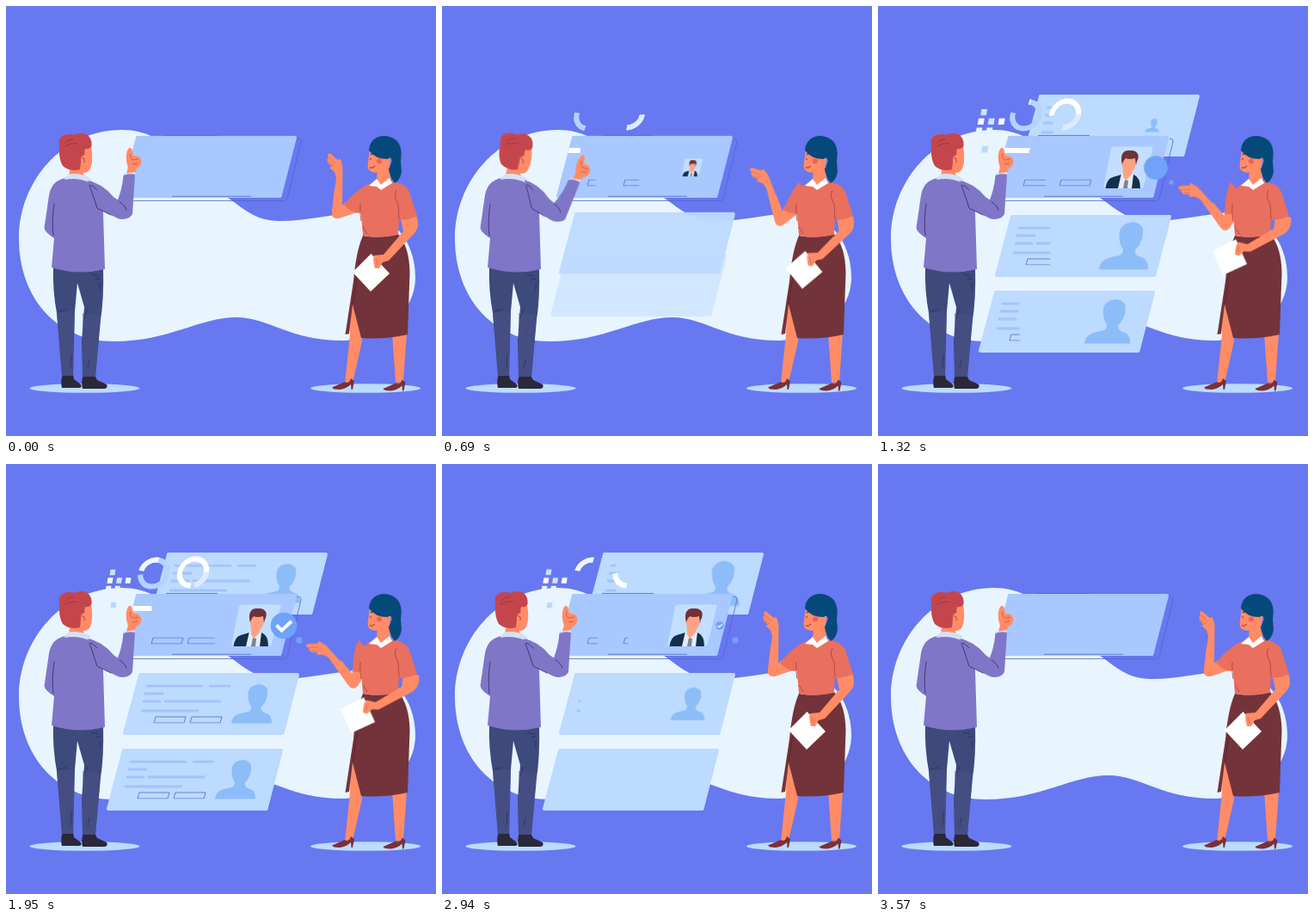
An HTML page without scripts that plays this animation: 500 by 500 pixels, repeating every 3.66 s.

```html
<!DOCTYPE html>
<html lang="en">
<head>
<meta charset="utf-8">
<title>Choosing a candidate</title>
<style>
html, body { margin: 0; width: 100%; height: 100%; overflow: hidden; background: #6878f0; }
svg { display: block; width: 100vw; height: 100vh; }

.skin { fill: #ff8c66; }
.outline { fill: none; stroke: #5268cc; stroke-width: .8; }
.crease { fill: none; stroke: #2f2c5c; stroke-width: .8; stroke-linecap: round; }
.rows { fill: none; stroke: #a2c4fa; stroke-width: 3; }
.panel { stroke-width: 4; stroke-linejoin: round; }

/* --i delays the entrance, --o the exit, --d the slide */
.slide, .pop, .pop > g, .wipe, .wipe > g, .anim {
  animation: 3660ms linear infinite;
}
.slide { animation-name: slide; animation-timing-function: ease-in-out; animation-delay: calc(var(--d) - 3660ms); }
.pop, .pop > g, .photo { transform-box: fill-box; transform-origin: center; }
.pop { animation-name: popIn; animation-delay: calc(var(--i) - 3660ms); }
.pop > g { animation-name: popOut; animation-delay: calc(var(--o) - 3660ms); }
.wipe { animation-name: wipeIn; animation-timing-function: ease-in-out; animation-delay: calc(var(--i) - 3660ms); }
.wipe > g { animation-name: wipeOut; animation-timing-function: ease-in-out; animation-delay: calc(var(--o) - 3660ms); }

@keyframes slide {
  0%, 8.2% { transform: translate(var(--x), var(--y)); opacity: 0; }
  20.5%, 82% { transform: none; opacity: 1; }
  88.8%, 100% { transform: translate(var(--x), var(--y)); opacity: 0; }
}
@keyframes popIn {
  0%, 29.5% { transform: scale(0); }
  33.3% { transform: scale(1.13); }
  35.5% { transform: scale(1.23); }
  43.7%, 98.9% { transform: scale(1); }
  98.91%, 100% { transform: scale(0); }
}
@keyframes popOut {
  0%, 6.8% { transform: scale(0); }
  6.81%, 67.8% { transform: scale(1); }
  73.2% { transform: scale(1.23); }
  74.9% { transform: scale(1.15); }
  77.6% { transform: scale(.85); }
  79.8%, 100% { transform: scale(0); }
}
@keyframes wipeIn {
  0%, 23.8% { clip-path: inset(0 100% 0 0); }
  51.1%, 98.9% { clip-path: inset(0 0% 0 0); }
  98.91%, 100% { clip-path: inset(0 100% 0 0); }
}
@keyframes wipeOut {
  0%, 6.8% { clip-path: inset(0 100% 0 0); }
  6.81%, 54.1% { clip-path: inset(0 0% 0 0); }
  81.4%, 100% { clip-path: inset(0 100% 0 0); }
}

.photo { animation-name: photo; }
@keyframes photo {
  0%, 17.4% { transform: scale(0); }
  21.3% { transform: scale(1.13); }
  23.5% { transform: scale(1.2); }
  31.7%, 81.4% { transform: scale(1); }
  86.9% { transform: scale(1.2); }
  92.9%, 100% { transform: scale(0); }
}
.bar { animation-name: bar; }
@keyframes bar {
  0%, 8.2% { clip-path: inset(0 100% 0 0); }
  30.9%, 45.1% { clip-path: inset(0 0% 0 0); }
  77.9%, 100% { clip-path: inset(0 100% 0 0); }
}
.first { animation-name: first; }
@keyframes first {
  0%, 8.2% { clip-path: inset(0 100% 0 0); }
  47.8%, 64.2% { clip-path: inset(0 0% 0 0); }
  88.8%, 100% { clip-path: inset(0 100% 0 0); }
}
.second { animation-name: second; }
@keyframes second {
  0%, 2.5% { clip-path: inset(0 100% 0 0); }
  35.5%, 47.8% { clip-path: inset(0 0% 0 0); }
  86.1%, 100% { clip-path: inset(0 100% 0 0); }
}
.trim { animation-name: trim; stroke-dasharray: 360 400; }
@keyframes trim {
  0%, 10.7% { stroke-dashoffset: -360; }
  43.7%, 51.6% { stroke-dashoffset: 0; }
  89.3%, 100% { stroke-dashoffset: 360; }
}
.check { animation-name: check; stroke-dasharray: 24 40; }
@keyframes check {
  0%, 36.6% { stroke-dashoffset: 26; }
  43.7%, 100% { stroke-dashoffset: 0; }
}

.joint { transform-origin: var(--at); animation-timing-function: ease-in-out; }
.nod { animation-name: nod; }
@keyframes nod {
  0%, 5.5%, 31.4%, 100% { transform: none; }
  18.9% { transform: rotate(var(--turn)); }
}
.present { animation-name: present; }
@keyframes present {
  0%, 8.2% { transform: none; }
  29.5%, 57.4% { transform: rotate(var(--turn)); }
  73.5%, 100% { transform: none; }
}
.lift { animation-name: lift; }
@keyframes lift {
  0%, 12% { transform: none; }
  34.2%, 58.7% { transform: rotate(var(--turn)); }
  77.9%, 100% { transform: none; }
}
</style>
</head>
<body>
<svg viewBox="0 0 500 500">
  <defs>
    <path id="panel" class="panel" d="M156 245H339L321.500 313H138Z"/>
    <path id="btn" class="outline" d="M174 294H209L207 301H172Z"/>
    <g id="rows">
      <path class="rows" d="M163 258H229M236 258H261M161 267H183M159 276H180M184 276H250M157 287H224"/>
      <use href="#btn"/>
      <use href="#btn" x="42"/>
    </g>
    <path id="bust" fill="#8cbdf8" d="M262 301.500C263 293 268 291 277 289C283 288 285 287 285 282C281 277 281 268 282 264C285 255 300 253 304 262C305 270 302 278 297 282C296 287 298 288 303 290C308 292 309 296 309 301.500Z"/>
    <path id="tile" d="M-2.500 -3.200H3.500L2.500 3.200H-3.500Z"/>
    <path id="heel" fill="#7b3036" d="M401 433L405 436L403 446H401.500L401 440Q396 445 388 446Q380 446 379 443.500L394 437Q399 440 401 433Z"/>
    <circle id="ring" r="15.500" fill="none" pathLength="360"/>
    <mask id="trim" maskUnits="userSpaceOnUse" x="-30" y="-30" width="60" height="60">
      <circle class="anim trim" r="15.500" fill="none" stroke="#fff" stroke-width="8" pathLength="360"/>
    </mask>
  </defs>

  <path fill="#e8f5ff" d="M135 144C65 144 15 205 15 270C15 340 60 390 125 390C190 390 225 362 268 362C305 362 330 389 390 389C440 389 476 355 476 315C476 270 445 238 408 240C380 242 350 250 318 250C285 250 272 230 250 218C215 195 190 144 135 144Z"/>
  <g fill="#bbdbff">
    <ellipse cx="91.500" cy="444.500" rx="64" ry="5.300"/>
    <ellipse cx="418" cy="444.500" rx="64" ry="5.300"/>
  </g>

  <!-- waiting cards -->
  <g transform="translate(-19 88)">
    <g class="slide" style="--d:160ms;--x:19px;--y:-88px;--i:100ms;--o:0ms">
      <use href="#panel" fill="#bddaff" stroke="#bddaff"/>
      <g class="wipe"><g><use href="#rows"/></g></g>
      <g class="pop"><g><use href="#bust"/></g></g>
    </g>
  </g>
  <g class="slide" style="--d:0ms;--x:-3px;--y:-92px;--i:0ms;--o:100ms">
    <use href="#panel" fill="#bddaff" stroke="#bddaff"/>
    <g class="wipe"><g><use href="#rows"/></g></g>
    <g class="pop"><g><use href="#bust"/></g></g>
  </g>
  <g transform="translate(33 -140)">
    <g class="slide" style="--d:330ms;--x:-36px;--y:48px;--i:200ms;--o:200ms">
      <use href="#panel" fill="#bddaff" stroke="#bddaff"/>
      <g class="wipe"><g><use href="#rows"/></g></g>
      <g class="pop"><g><use href="#bust"/></g></g>
    </g>
  </g>

  <!-- charts and tiles -->
  <g stroke-width="6">
    <g transform="translate(172 127) skewX(-10) rotate(190)">
      <g mask="url(#trim)">
        <use href="#ring" stroke="#b4d3ff"/>
        <use href="#ring" stroke="#f2f8ff" stroke-dasharray="90 270"/>
      </g>
    </g>
    <g transform="translate(217.500 126) skewX(-10) rotate(90)">
      <g mask="url(#trim)">
        <use href="#ring" stroke="#fff"/>
        <use href="#ring" stroke="#dcebff" stroke-dasharray="0 270 90"/>
      </g>
    </g>
  </g>
  <g class="pop" style="--i:-100ms;--o:450ms"><g fill="#fff">
    <use href="#tile" x="124" y="126" fill="#cfe3ff"/>
    <use href="#tile" x="121" y="135.500"/>
    <use href="#tile" x="131.500" y="135.500" fill="#cfe3ff"/>
    <use href="#tile" x="142" y="135.500"/>
    <use href="#tile" x="119" y="145" fill="#e8f5ff"/>
    <use href="#tile" x="129.500" y="145" fill="#e8f5ff"/>
    <use href="#tile" x="125" y="164" fill="#b9d7ff"/>
  </g></g>

  <!-- chosen card -->
  <path class="outline" d="M339 154.500H341Q343.500 155 343 158L327 224Q326 226.500 323 226.500H140"/>
  <g transform="translate(-3 -92)">
    <use href="#panel" fill="#a8c8ff" stroke="#a8c8ff"/>
    <use href="#btn" class="anim first"/>
    <g class="anim second"><use href="#btn" x="42"/></g>
  </g>
  <path class="outline" d="M186 150.500H246M193 221.300H285"/>
  <path class="anim bar" fill="#fff" d="M148 165H177L175.500 171H146.500Z"/>
  <g class="anim photo">
    <path fill="#c3deff" d="M274 163.500H317Q320 163.500 319.500 166L309 209Q308 212 305 212H264Q262 212 262.500 209L271 166Q271.500 163.500 274 163.500Z"/>
    <path fill="#12304c" d="M264.500 212Q266 201 273 199L283 196H297Q305 199 305 212Z"/>
    <path fill="#e6ecf6" d="M283 195L279 212H295L297 196Z"/>
    <path fill="#7c8295" d="M287 202L291 203L290 212H285Z"/>
    <path fill="#ffa284" d="M285 175H300Q301 187 296 192L294 197L288 203L285 198V190Q282 182 285 175Z"/>
    <path fill="#6e3238" d="M284 184C281 173 285 167 293 168C302 167 305 174 301 181L300 185L299 177Q292 179 288 177Q285 180 284 184Z"/>
  </g>
  <g class="pop" style="--i:130ms;--o:50ms"><g>
    <circle cx="323" cy="188" r="15.300" fill="#70a2f8"/>
    <path class="anim check" fill="none" stroke="#fff" stroke-width="4" d="M314.500 187.500L320.500 193.500L332 183"/>
  </g></g>
  <g class="pop" style="--i:150ms;--o:460ms"><g><circle cx="341" cy="205" r="3.700" fill="#70a2f8"/></g></g>

  <!-- man -->
  <g>
    <path fill="#2b2838" d="M66 428H78L79 434L87 440Q89 444 85 444H65Q63 436 66 428ZM90 429H103L106 435L117 440Q119 444 115 445H89Q87 437 90 429Z"/>
    <path fill="#3e497c" d="M55 303H113Q114 340 110 365L104 431H89L88 390L91 350L83 322L80 355L78 430H65L59 357Q54 330 55 303Z"/>
    <path fill="#4a558a" d="M59 357L80 355L78 430H65ZM89 357L110 360L104 431H89Z" opacity=".5"/>
    <path class="crease" d="M61 355L70 353M76 405L75 420M99 312L107 314M104 318L109 317M109 322V330M95 352L91 362M95 420L97 412"/>
    <g class="anim joint nod" style="--at:86px 203px;--turn:8deg">
      <path class="skin" d="M80 165L99 163Q102 180 98 189Q96 194 90 194L92 204H72L75 185Z"/>
      <path fill="#c4464c" d="M62 161C59 150 72 147 80 150C90 145 101 150 99.500 163Q97 167 92 166Q91 169 91.500 173Q86 174 87 181L86 190Q74 193 66 186Q61 178 62 161Z"/>
      <path fill="none" stroke="#8f343f" stroke-width=".8" d="M69 160Q72 154 79 155M68 163Q76 159 83 160M88 177Q92 176 91 182"/>
    </g>
    <path fill="#8076c8" d="M69 200Q53 203 50 220L44.500 258Q45 263 56 270L53 304Q84 314 115 306L113 240Q114 214 97 202Q84 198 69 200Z"/>
    <path fill="#d4e1f8" d="M68 202Q70 195 77 195Q90 195 98 200L98.500 206Q84 199 68 202Z"/>
    <path class="crease" d="M56 230Q53 250 55 267"/>
    <g class="anim joint nod" style="--at:103px 215px;--turn:5deg">
      <path fill="#8076c8" d="M95 203Q112 206 125 222L139 232L146 243Q140 250 130 247L104 234Z"/>
      <g class="anim joint nod" style="--at:137px 239px;--turn:13deg">
        <path class="skin" d="M140 197L142 188Q138 178 141 168Q144 162 146.500 167L148 174Q156 173 157.500 180Q157 187 152 189L148 197Z"/>
        <path fill="none" stroke="#c9503f" stroke-width=".8" d="M145 172Q143 177 148 179L154 178M147 184L153 183"/>
        <path fill="#d4e1f8" d="M136.500 195L150 193V198H136Z"/>
        <path fill="#8076c8" d="M136.500 197Q143 194 150 196L147 242Q142 250 132 246L128 230Q135 215 136.500 197Z"/>
      </g>
      <path class="crease" d="M97 209Q99 213 106 235L122 243M106 214Q102 209 98 208"/>
      <path class="crease" d="M132 228Q138 231 140 237"/>
    </g>
  </g>

  <!-- woman -->
  <g>
    <path class="skin" d="M401 340L413 378L414 390L403 438L394 439L400 382ZM449 380H466L462 437L453 438Z"/>
    <use href="#heel"/>
    <use href="#heel" x="59.500" y="1.500"/>
    <path fill="#73333a" d="M415 267Q435 271 456 265Q469 280 469.500 310L467 382Q440 388 413 386L403 347L399 381L394.500 382L404 320Q407 285 415 267Z"/>
    <path fill="none" stroke="#522029" stroke-width=".8" d="M403 347Q407 320 411 296"/>
    <g class="anim joint present" style="--at:413px 222px;--turn:-40deg">
      <path class="skin" d="M395 228L411 239L387 247Q378 248 379 240L382 212H391V232Z"/>
      <g class="anim joint present" style="--at:386px 241px;--turn:-3deg">
        <path class="skin" d="M379 240L384 200L382 193L376 188L379 187L374 182L373.500 177L375 177L374 172L377 171.500L386 179L389 178L391.500 187L391 236Q383 247 379 240Z"/>
        <path fill="none" stroke="#d95f47" stroke-width=".7" d="M376 176L383 183M375 181L381 186"/>
      </g>
      <path fill="#e96f5f" d="M422 207Q410 211 393 231Q400 239 410 241L421 232Z"/>
    </g>
    <path fill="#e96f5f" d="M426 205Q412 212 408 228L413 242L415 267Q435 271 456 266L457 245L470 232L463 211Q457 205 445 202Z"/>
    <path class="skin" d="M432 190H447V203L436 211L431 203Z"/>
    <path fill="#fff" d="M422 209L431 201L436 208L446 200L449 206L436 214L431 210Z"/>
    <path class="skin" d="M423 166L420.500 186Q421 193 428 193.500Q440 195 446 188L448 172L436 162Z"/>
    <path fill="#05497a" d="M422 168C423 153 436 149 446 152C459 156 461 167 459 180L460 193Q458 203 452 206Q446 198 445 190L449 180Q447 174 444 178Q429 178 422 168Z"/>
    <circle cx="434" cy="180.500" r="3" fill="#f0605a"/>
    <path fill="none" stroke="#6b2b35" stroke-width=".9" d="M423.500 172.500H426M424 177V179M423 188Q427 189 429 186"/>
    <g class="anim joint lift" style="--at:470px 255px;--turn:19deg">
      <path fill="#fff" d="M424.500 288L446 311L424 332L403 309.500Z"/>
      <path class="skin" d="M458 243L477 243Q482 256 475 264L445 296L438 298L434 305H429Q426 295 428 290L439 289L462 262Z"/>
      <path fill="none" stroke="#d95f47" stroke-width=".7" d="M430 294L432 302"/>
    </g>
    <path fill="#e96f5f" d="M458 206Q468 211 470 219L478 244Q468 249 456 249L454 226Z"/>
    <path fill="none" stroke="#a8413f" stroke-width=".8" d="M454 214Q450 221 456 230L457 248M412 230Q411 240 413 250M415 257L420 265"/>
  </g>
</svg>
</body>
</html>
```
